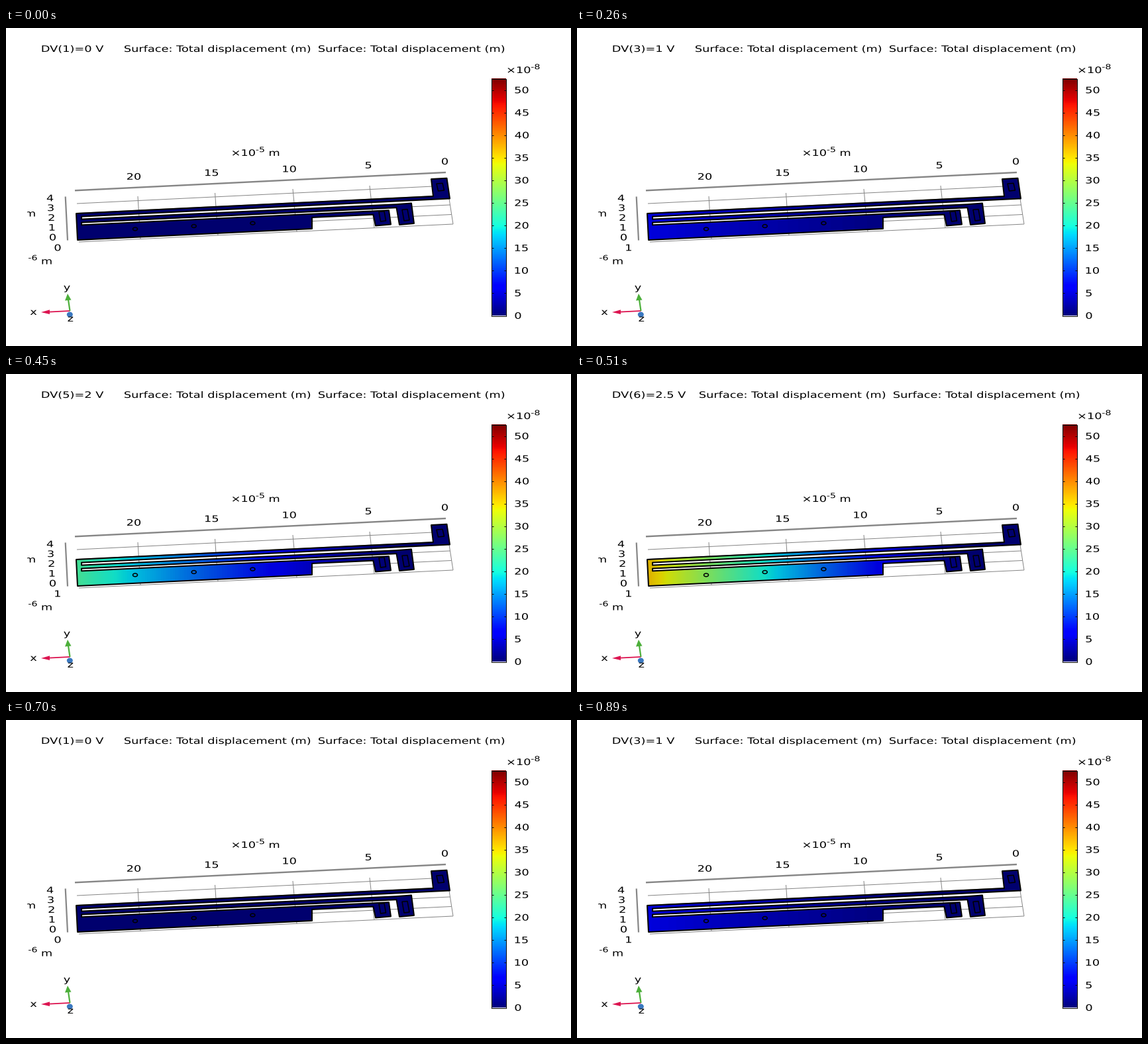
Animation, 853 px wide and 480 px high, one loop 1020 ms. Source, as a matplotlib script:

```python
import matplotlib.pyplot as plt
import numpy as np
from matplotlib.animation import FuncAnimation
from matplotlib.patches import Ellipse, PathPatch, Polygon, Rectangle
from matplotlib.textpath import TextPath
from matplotlib.transforms import Affine2D

W, H, DPI = 853, 480, 64
PX = 72 / DPI            # points per pixel
ASPECT = 1.335           # the whole view is wider than tall
SIZE = 13.3
LOOP, TICK = 1020, 10
STARTS = [0, 130, 260, 320, 450, 510, 640, 700, 830, 890]
STEPS = 7
GREY = "#868686"

plt.rcParams["font.family"] = "DejaVu Sans"
fig = plt.figure(figsize=(W / DPI, H / DPI), dpi=DPI, facecolor="white")
ax = fig.add_axes([0, 0, 1, 1])
ax.axis("off")
jet = plt.get_cmap("jet")


def glyphs(text, x, y, size=SIZE, center=False):
    """Text outline with its ink starting (or centred) at x, baseline at y."""
    path = TextPath((0, 0), text, size=size)
    box = path.get_extents()
    anchor = (box.x0 + box.x1) / 2 if center else box.x0
    move = Affine2D().translate(-anchor, 0).scale(ASPECT, -1).translate(x, y)
    return move.transform_path(path)


def label(text, x, y, size=SIZE, center=False):
    patch = PathPatch(glyphs(text, x, y, size, center), fc="black", lw=0, zorder=6)
    return ax.add_patch(patch)


def number(value, x, y):
    return label(str(value), x, y + 4.85, center=True)


def power(exponent, x, y):
    label("×10", x, y)
    label(exponent, x + 35.5, y - 5.8, SIZE * 0.8)


def line(p, q, color=GREY, width=1.0, zorder=1):
    ax.plot(*zip(p, q), color=color, lw=width * PX, zorder=zorder,
            solid_capstyle="butt")


def shape(points, fc="none", ec="none", width=1.0, zorder=4):
    return ax.add_patch(Polygon(points, fc=fc, ec=ec, lw=width * PX,
                                joinstyle="round", zorder=zorder))


def draw_box():
    for k in range(5):
        line((110 - 0.75 * k, 323 - 14.5 * k), (675 - 2.5 * k, 296 - 14.5 * k))
    for top, bottom in [((199, 254), (203, 319)), ((315.5, 249), (320, 313)),
                        ((433, 243), (439, 307.5)), ((549, 238), (556, 302)),
                        ((665, 232), (675, 296))]:
        line(top, bottom)
    line((104, 245.3), (664, 218), width=2.4)
    line((89.7, 254.5), (93, 320.5), width=2.2)
    for k in range(5):
        number(20 - 5 * k, [193, 310.5, 428, 547, 662.5][k], 224 - 5.7 * k)
        number(4 - k, 66.5 + k, 256.5 + 14.8 * k)
    power("-5", 342, 193)
    label("m", 398, 193)
    label("m", 29.5, 284.5)
    label("-6", 34, 350.5, SIZE * 0.8)
    label("m", 54.5, 356.5)
    ax.add_patch(Rectangle((0, 0), 32, H, fc="white", zorder=7))


def draw_colorbar():
    x0, x1, top, bottom = 733.5, 755.5, 76.5, 434.5
    ramp = jet(np.linspace(1, 0, 360))[:, None, :]
    ax.imshow(ramp, extent=(x0, x1, bottom, top), aspect="auto", zorder=2)
    for k in range(11):
        y = bottom - 34.05 * k
        label(str(5 * k), 768.5, y + 4.4)
        line((x0, y), (x0 + 3, y), "black", zorder=3)
        line((x1 - 3, y), (x1, y), "black", zorder=3)
    ax.add_patch(Rectangle((x0, top), x1 - x0, bottom - top, fc="none",
                           ec="black", lw=PX, zorder=4))
    power("-8", 757.5, 68)


def draw_triad():
    red, green, blue = "#dc1450", "#4caf3a", "#3a78c0"
    line((96.5, 427), (65, 428.6), red, 1.8, 3)
    shape([(53, 429), (66, 425.3), (66, 432)], red)
    line((96.5, 427), (94, 410), green, 2.2, 3)
    shape([(93, 401), (89, 411.5), (98.5, 410.5)], green)
    ax.add_patch(Ellipse((96.3, 432.5), 9, 8, fc=blue, zorder=4))
    label("x", 41.5, 433, center=True)
    label("y", 92, 396, center=True)
    label("z", 97.3, 443, center=True)


def draw_plate():
    outline = shape([
        (106, 280), (645, 254), (642, 228), (665.5, 226.7), (670, 257.5),
        (114, 284.6), (114, 288.6), (589, 266.2), (612, 264.5), (616, 295),
        (594, 297), (589.5, 271.2), (114, 293.6), (114, 297.3), (578, 275.2),
        (581, 296.5), (558, 298.5), (554.5, 281.7), (462, 286), (462, 303),
        (108, 320)], ec="black", width=2)
    for window in [[(650, 235), (659, 234.3), (661.5, 245), (652.5, 246)],
                   [(598, 274.3), (606, 273.6), (609, 290), (601, 291)],
                   [(563, 277.5), (571, 276.8), (573.5, 291), (565.5, 292)]]:
        shape(window, ec="black", width=1.5)
    for k in range(3):
        ax.add_patch(Ellipse((195 + 88.7 * k, 303.4 - 4.4 * k), 7, 4.8,
                             fc="none", ec="black", lw=1.5 * PX, zorder=4))
    surface = ax.imshow(np.zeros((1, 580, 3)), extent=(100, 680, 330, 220),
                        aspect="auto", zorder=2)
    surface.set_clip_path(outline)
    return surface


draw_box()
draw_colorbar()
draw_triad()
surface = draw_plate()
ax.set_xlim(0, W)
ax.set_ylim(H, 0)

# Displacement fades from the free end towards the anchors.
columns = np.arange(100, 680) + 0.5
profile = np.clip((600 - columns) / 493, 0, 1) ** 1.4

TITLE_Y = 36
title = label("DV", 54, TITLE_Y)
captions = [label("Surface", 179, TITLE_Y) for _ in range(2)]
depth = number(0, 78, 331.5)


def update(frame):
    step = (np.searchsorted(STARTS, frame * TICK, side="right") - 1) % STEPS
    volts = step / 2
    title.set_path(glyphs(f"DV({step + 1})={volts:g} V", 54.5, TITLE_Y))
    start = 185 if step % 2 else 179
    for k, caption in enumerate(captions):
        caption.set_path(glyphs("Surface: Total displacement (m)",
                                start + 293 * k, TITLE_Y))
    depth.set_path(glyphs(str(min(step, 1)), 78, 336.3, center=True))
    level = np.clip(profile * (volts / 3) ** 2, 0, 1)   # heating goes with V²
    surface.set_data(0.87 * jet(level)[None, :, :3])
    return [title, *captions, depth, surface]


anim = FuncAnimation(fig, update, frames=LOOP // TICK, interval=TICK,
                     repeat=True, repeat_delay=0, blit=False)
plt.show()
```
